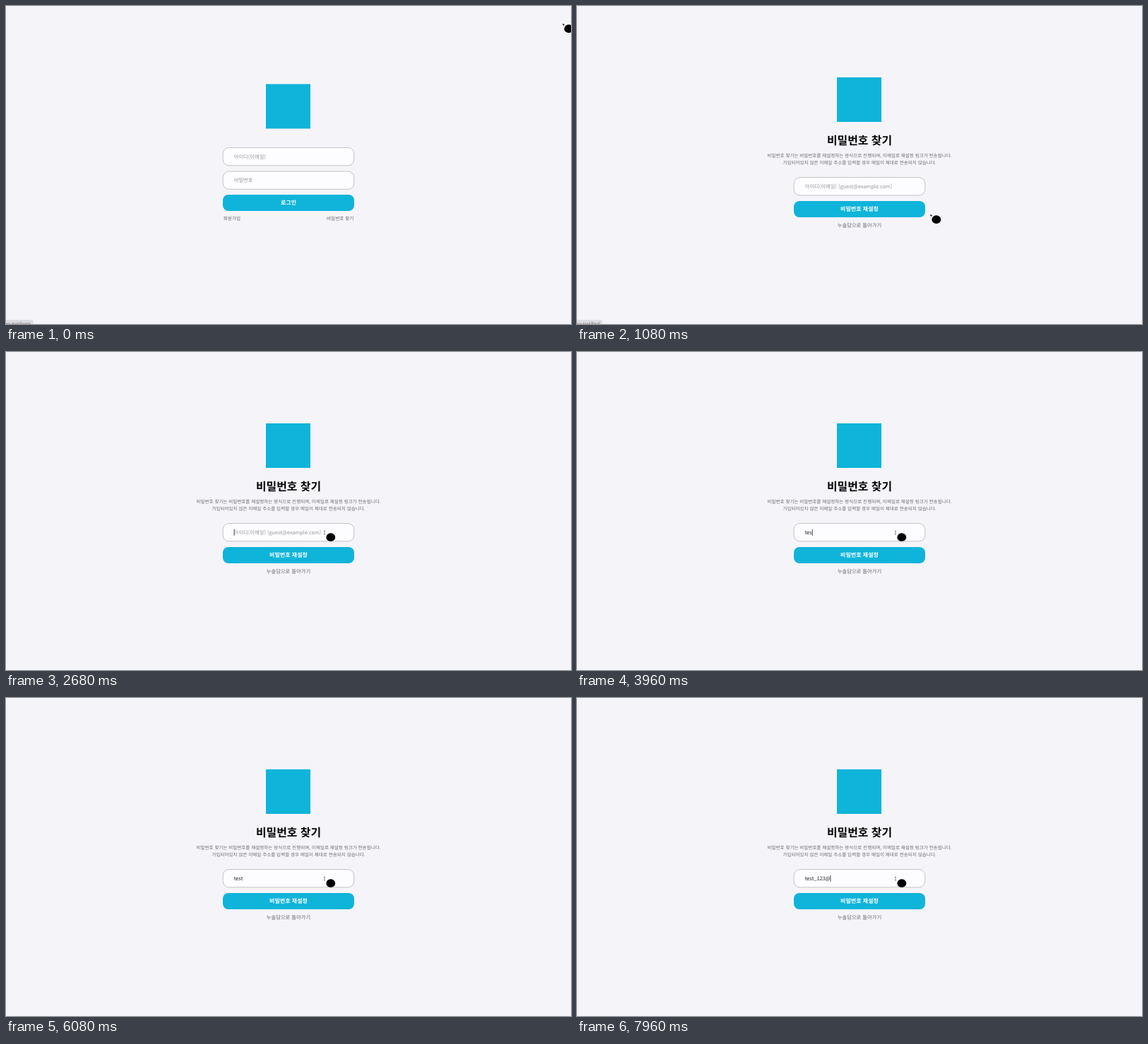
These frames come from a looping animation (800 by 450 pixels, 8000 ms). An HTML page:

```html
<!DOCTYPE html>
<html lang="ko">
<head>
<meta charset="utf-8">
<title>비밀번호 찾기</title>
<style>
  html, body { margin: 0; width: 100%; height: 100%; overflow: hidden; background: #f5f4f9; }
  svg { display: block; width: 800px; height: 450px; }
  text { font: 7.3px "Noto Sans CJK KR", "Noto Sans CJK", sans-serif; text-rendering: geometricPrecision; }
  .logo, .button { fill: #0fb4da; }
  .field { fill: #fdfcff; stroke: #c4c2c6; stroke-width: 1; }
  .hint { fill: #98979c; }
  .label { font-size: 8px; font-weight: 700; fill: #fff; }
  .title { font-size: 15.9px; font-weight: 700; fill: #050505; }
  .note { font-size: 6.56px; fill: #6c6c74; }
  .link { font-size: 6.6px; font-weight: 500; fill: #66666d; }
  .back { font-weight: 500; fill: #66666d; }
  .mid { text-anchor: middle; }
  .end { text-anchor: end; }
</style>
</head>
<body>
<svg viewBox="0 0 800 450">
  <g id="login">
    <rect class="logo" x="368" y="110.5" width="63" height="63"/>
    <rect class="field" x="307.2" y="200.5" width="185.6" height="25.3" rx="8.5"/>
    <text class="hint" x="322.7" y="215.7">아이디(이메일)</text>
    <rect class="field" x="307.2" y="234" width="185.6" height="25.3" rx="8.5"/>
    <text class="hint" x="322.7" y="249.2">비밀번호</text>
    <rect class="button" x="307" y="267" width="186" height="23" rx="8"/>
    <text class="label mid" x="400" y="281.3">로그인</text>
    <text class="link" x="307.7" y="303">회원가입</text>
    <text class="link end" x="492.3" y="303">비밀번호 찾기</text>
  </g>
  <g id="find">
    <rect class="logo" x="368" y="101" width="63" height="63"/>
    <text class="title mid" x="400" y="195.8">비밀번호 찾기</text>
    <text class="note mid" x="400" y="214">비밀번호 찾기는 비밀번호를 재설정하는 방식으로 진행되며, 이메일로 재설정 링크가 전송됩니다.</text>
    <text class="note mid" x="400" y="224">가입되어있지 않은 이메일 주소를 입력할 경우 메일이 제대로 전송되지 않습니다.</text>
    <rect class="field" x="307.2" y="242.6" width="185.6" height="25.3" rx="8.5"/>
    <text class="hint" id="hint" x="322.7" y="257.8">아이디(이메일) (guest@example.com)</text>
    <text id="typed" x="322.7" y="257.8" fill="#222"></text>
    <rect id="caret" y="250.6" width="0.8" height="9.2" fill="#222"/>
    <rect class="button" x="307" y="276" width="186" height="23" rx="8"/>
    <text class="label mid" x="400" y="290.2">비밀번호 재설정</text>
    <text class="back mid" x="400" y="312.6">누솔담으로 돌아가기</text>
  </g>
  <g id="status">
    <rect id="statusBox" x="-4" y="444.3" height="10" rx="1.5" fill="#dcdbe0"/>
    <text id="statusText" class="end" y="452" fill="#6d5a57" style="font-size:6px"></text>
  </g>
  <g id="cursor">
    <path id="arrow" d="M0 0L3 .9L1.2 3Z"/>
    <path id="beam" d="M-1 -1.5H1M0 -1.5V3M-1 3H1" fill="none" stroke="#444" stroke-width=".6"/>
    <ellipse cx="8.8" cy="7.2" rx="6.4" ry="5.9"/>
  </g>
</svg>
<script>
const LOOP = 8000, PAGE_CHANGE = 880, FOCUS = 2200;
const el = id => document.getElementById(id);
const show = (id, on) => { el(id).style.display = on ? "" : "none"; };
const clamp = v => Math.min(1, Math.max(0, v));

// time, x, y of the pointer tip
const path = [
  [0, 788, 25], [700, 474, 299], [860, 476, 298], [1080, 500, 295],
  [1300, 686, 288], [1660, 451, 255]
];
// time, character
const keys = [
  [3600, "t"], [3760, "e"], [3900, "s"], [4120, "t"],
  [6560, "_"], [6880, "1"], [7040, "2"], [7240, "3"], [7800, "@"]
];

function pointerAt(t) {
  const i = path.findIndex(p => p[0] > t);
  if (i < 0) return path[path.length - 1].slice(1);
  const [t0, x0, y0] = path[i - 1], [t1, x1, y1] = path[i];
  const u = (t - t0) / (t1 - t0), e = u * u * (3 - 2 * u);
  return [x0 + (x1 - x0) * e, y0 + (y1 - y0) * e];
}

function drawStatus(t) {
  const first = t < 700;
  const width = first ? 38.5 : 35.5;
  el("statusBox").setAttribute("width", width + 4);
  el("statusText").setAttribute("x", width - 3.5);
  el("statusText").textContent = first ? "demo.test/login" : "demo.test/find";
  el("status").style.opacity = first ? 1 - clamp((t - 120) / 200) : 1 - clamp((t - 1160) / 200);
}

function drawField(t) {
  const done = keys.filter(k => k[0] <= t);
  const typed = el("typed");
  typed.textContent = done.map(k => k[1]).join("");
  show("hint", !done.length);
  const since = t - (done.length ? done[done.length - 1][0] : FOCUS);
  show("caret", since >= 0 && since % 1000 < 500);
  el("caret").setAttribute("x", 322.7 + (done.length ? typed.getComputedTextLength() : 0));
}

function draw() {
  const t = performance.now() % LOOP;
  const onFind = t >= PAGE_CHANGE;
  show("login", !onFind);
  show("find", onFind);
  drawStatus(t);
  if (onFind) drawField(t);

  const [x, y] = pointerAt(t);
  const overField = onFind && x > 307 && x < 493 && y > 242 && y < 268;
  show("beam", overField);
  show("arrow", !overField);
  el("cursor").setAttribute("transform", `translate(${x} ${y})`);
  requestAnimationFrame(draw);
}
draw();
</script>
</body>
</html>
```
